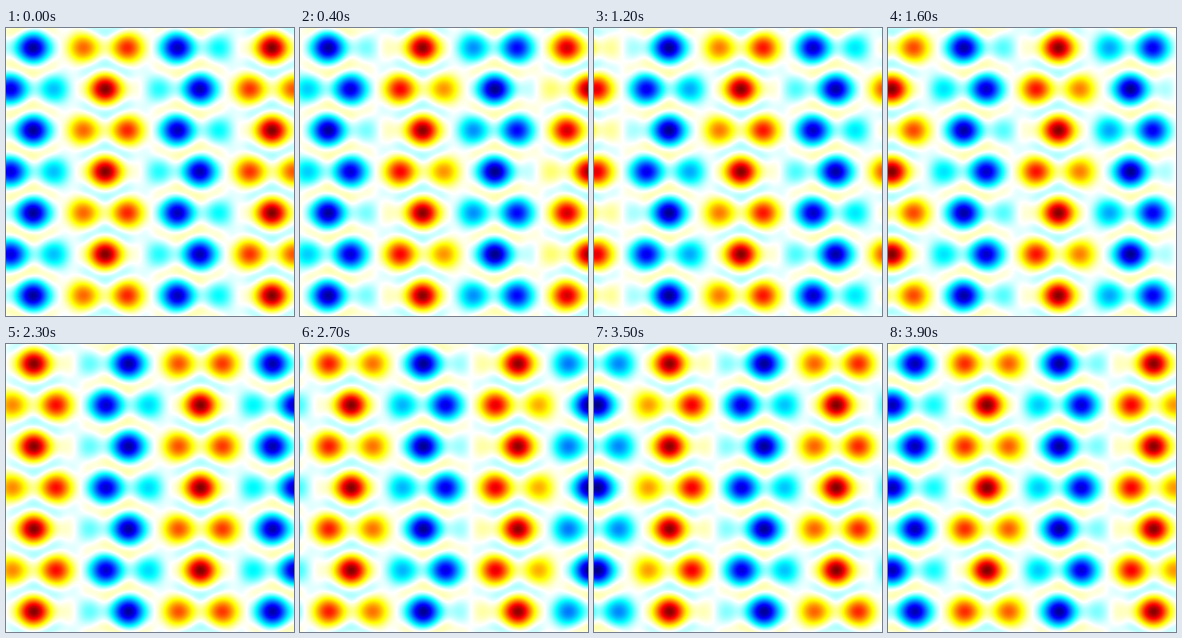
Animation of 360x360 px, one loop 4 s. Source, as a matplotlib script:

```python
import numpy as np
import matplotlib.pyplot as plt
from matplotlib.animation import FuncAnimation
from matplotlib.colors import LinearSegmentedColormap

SIZE = 360
FRAMES = 40
INTERVAL = 100

# Triangular lattice: spacing along a row, and the site nearest the middle
SPACING = 59.6
SITE_X, SITE_Y = 183.3, 179.6
SITE_PHASE = np.radians(100)

# Bloch wave: lengths along x are in units of the reciprocal vector K
K = 2 * np.pi / SPACING
WAVE_X = 0.292
UNIFORM, ACROSS, ALONG, OUTER = 0.25, 0.29, 0.42, 0.02
BACKWARD = 0.66

root3 = np.sqrt(3)
waves = [
    (0, 0, UNIFORM),
    (0, 2 / root3, ACROSS),
    (-1, 1 / root3, ALONG * BACKWARD),
    (1, 1 / root3, ALONG * (1 - BACKWARD)),
    (-2, 0, OUTER),
    (-1, root3, OUTER),
]

# A jet scale with white in the middle
cmap = LinearSegmentedColormap.from_list("white_jet", list(zip(
    np.array([0, 1, 3, 4, 5, 7, 8]) / 8,
    ["#000080", "blue", "cyan", "white", "yellow", "red", "#800000"])), N=1024)

pixels = np.arange(SIZE) + 0.5
x, y = np.meshgrid(K * (pixels - SITE_X), K * (pixels - SITE_Y))

# The waves at +y and -y pair up into a cosine across the rows
field = sum(
    weight * np.exp(1j * ((WAVE_X + gx) * x + SITE_PHASE)) * np.cos(gy * y)
    for gx, gy, weight in waves
)


def wave(frame):
    turn = 2 * np.pi * frame / FRAMES
    return (field * np.exp(-1j * turn)).real


fig = plt.figure(figsize=(SIZE / 100, SIZE / 100), dpi=100)
ax = fig.add_axes([0, 0, 1, 1])
ax.axis("off")
image = ax.imshow(wave(0), cmap=cmap, vmin=-1, vmax=1,
                  interpolation="nearest", aspect="auto")


def update(frame):
    image.set_data(wave(frame))
    return [image]


anim = FuncAnimation(fig, update, frames=FRAMES, interval=INTERVAL,
                     repeat=True, repeat_delay=0, blit=False)
plt.show()
```
